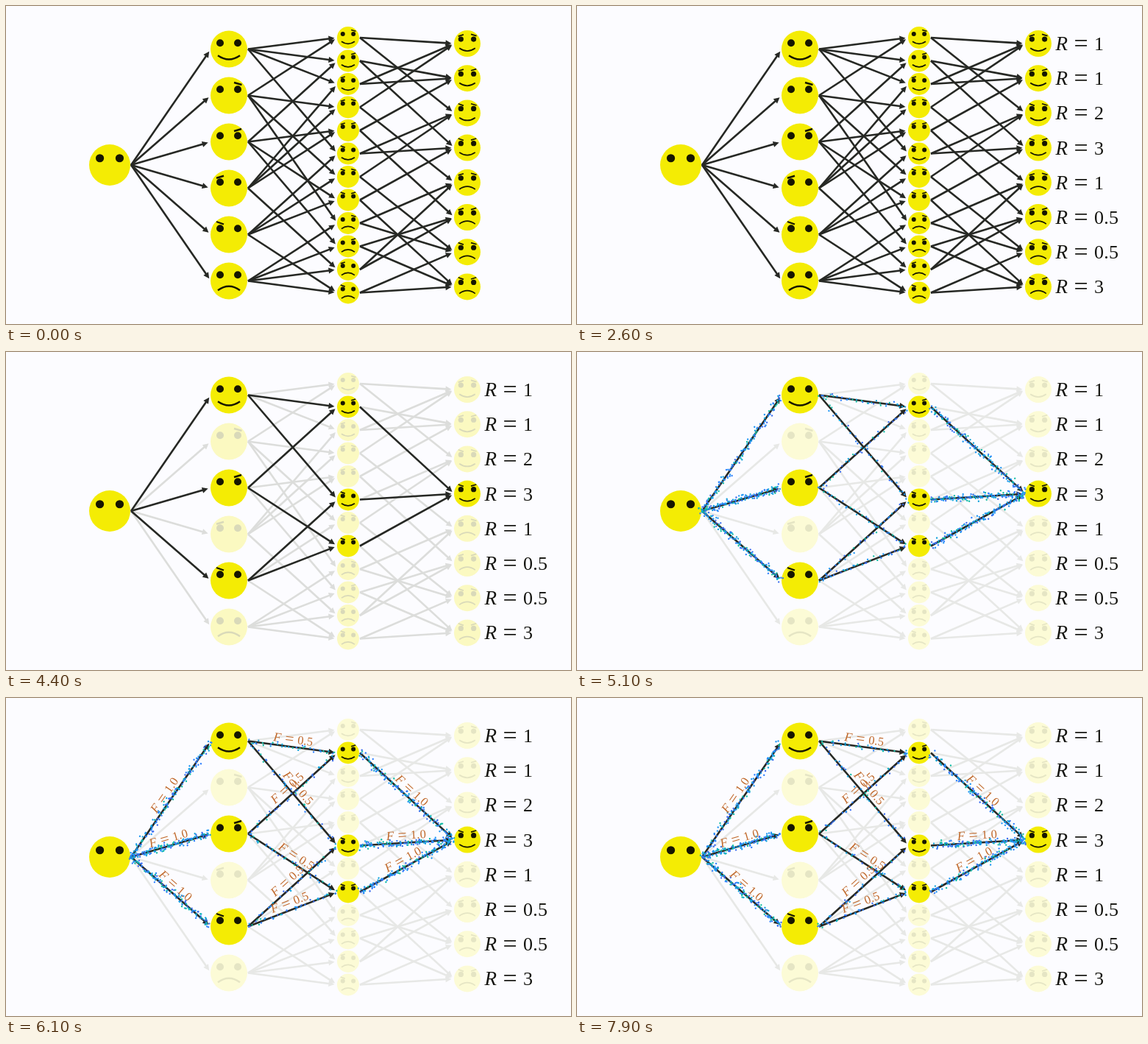
Animation of 768x432 px, one loop 8000 ms. Source, as an HTML page with a canvas:

```html
<!DOCTYPE html>
<html lang="en">
<head>
<meta charset="utf-8">
<title>Flow network of faces</title>
<style>
  html, body { margin: 0; width: 100%; height: 100%; overflow: hidden; background: #fcfcff; }
  canvas { display: block; width: 768px; height: 432px; }
</style>
</head>
<body>
<canvas id="stage" width="768" height="432"></canvas>
<script>
const ctx = document.getElementById('stage').getContext('2d');
const LOOP = 8000;
const SERIF = '"Liberation Serif", serif';
const REWARDS = ['1', '1', '2', '3', '1', '0.5', '0.5', '3'];
const DOTS = ['#2f80ff', '#14a4dc', '#10bca4', '#3a6cf0', '#1f96f4'];

const clamp = x => Math.max(0, Math.min(1, x));
const smooth = x => x * x * x * (10 - 15 * x + 6 * x * x);
const span = (t, from, to) => clamp((t - from) / (to - from));
const mix = (a, b, p) => `rgb(${a.map((v, i) => Math.round(v + (b[i] - v) * p))})`;

// Seeded random numbers
let seed = 7;
function rand() {
  seed = (seed * 1664525 + 1013904223) % 4294967296;
  return seed / 4294967296;
}

// Features: s smile, f frown, r/R right brow falling/rising, l/L left brow rising/falling
const LAYERS = [
  { x: 141, y: 216, step: 0, r: 28, parts: [''] },
  { x: 303, y: 58.5, step: 63, r: 25, parts: ['s', 'r', 'R', 'l', 'L', 'f'] },
  { x: 465, y: 43, step: 31.5, r: 15,
    parts: ['sr', 'sR', 'sl', 'rl', 'Rl', 'sL', 'rL', 'RL', 'fr', 'fR', 'fl', 'fL'] },
  { x: 627, y: 51, step: 47.2, r: 18,
    parts: ['srl', 'sRl', 'srL', 'sRL', 'frl', 'fRl', 'frL', 'fRL'] }
];
const GOAL = 'sRL';
const contains = (whole, part) => [...part].every(c => whole.includes(c));

const layers = LAYERS.map(({ x, y, step, r, parts }) =>
  parts.map((p, i) => ({ x, y: y + i * step, r, parts: p, hot: contains(GOAL, p) })));
const faces = layers.flat();

const edges = [];
for (let k = 0; k < 3; k++) {
  for (const a of layers[k]) {
    for (const b of layers[k + 1]) {
      if (contains(b.parts, a.parts)) edges.push(makeEdge(a, b, k === 1 ? 0.5 : 1));
    }
  }
}
edges.sort((a, b) => a.hot - b.hot);
const hotEdges = edges.filter(e => e.hot);

function makeEdge(a, b, flow) {
  const x = a.x + a.r + 1, y = a.y;
  const dx = b.x - b.r - x + 0.5, dy = b.y - y;
  return { x, y, angle: Math.atan2(dy, dx), length: Math.hypot(dx, dy) - 4, hot: b.hot && a.hot, flow };
}

const dots = hotEdges.flatMap(edge => {
  const count = edge.flow === 1 ? 130 : 34;
  return Array.from({ length: count }, (_, i) => ({
    edge,
    phase: (i + rand()) / count,
    speed: 0.45 + rand() * 0.06,
    offset: (rand() + rand() + rand() - 1.5) * 5 * edge.flow ** 0.4,
    color: DOTS[Math.floor(rand() * DOTS.length)]
  }));
});

function onEdge(edge, draw) {
  ctx.save();
  ctx.translate(edge.x, edge.y);
  ctx.rotate(edge.angle);
  draw();
  ctx.restore();
}

function line(x1, y1, x2, y2) {
  ctx.beginPath();
  ctx.moveTo(x1, y1);
  ctx.lineTo(x2, y2);
  ctx.stroke();
}

function disc(x, y, r) {
  ctx.beginPath();
  ctx.arc(x, y, r, 0, Math.PI * 2);
  ctx.fill();
}

function drawArrow(edge, dim) {
  const color = mix([38, 40, 36], [231, 232, 230], edge.hot ? 0 : dim);
  onEdge(edge, () => {
    ctx.strokeStyle = ctx.fillStyle = color;
    ctx.lineWidth = 2.6;
    line(0, 0, edge.length - 6, 0);
    ctx.beginPath();
    ctx.moveTo(edge.length, 0);
    ctx.lineTo(edge.length - 8, -4);
    ctx.lineTo(edge.length - 8, 4);
    ctx.fill();
  });
}

function drawFace({ x, y, r, parts, hot }, dim) {
  const p = hot ? 0 : dim;
  ctx.save();
  ctx.translate(x, y);
  ctx.fillStyle = mix([244, 236, 4], [252, 251, 214], p ** 1.8);
  disc(0, 0, r);
  ctx.fillStyle = ctx.strokeStyle = mix([22, 22, 0], [229, 229, 196], p);
  ctx.scale(r, r);
  disc(-0.48, -0.33, 0.2);
  disc(0.48, -0.33, 0.2);
  ctx.lineWidth = Math.max(0.095, 1.7 / r);
  const mouth = (end, control) => {
    ctx.beginPath();
    ctx.moveTo(-0.6, end);
    ctx.quadraticCurveTo(0, control, 0.6, end);
    ctx.stroke();
  };
  const features = {
    s: () => mouth(0.35, 0.77),
    f: () => mouth(0.51, 0.07),
    r: () => line(0.28, -0.7, 0.7, -0.58),
    R: () => line(0.28, -0.58, 0.68, -0.7),
    l: () => line(-0.68, -0.55, -0.28, -0.67),
    L: () => line(-0.68, -0.7, -0.28, -0.56)
  };
  for (const c of parts) features[c]();
  ctx.restore();
}

// Outline is traced first, then filled
function writeGlyph(char, font, x, y, a) {
  if (a <= 0) return;
  ctx.font = font;
  if (a < 1) {
    ctx.save();
    ctx.lineWidth = 0.8;
    ctx.setLineDash([Math.max(0.01, clamp(a * 2) * 70), 200]);
    ctx.globalAlpha = Math.min(1, 2 - a * 2);
    ctx.strokeText(char, x, y);
    ctx.restore();
  }
  if (a > 0.5) {
    ctx.save();
    ctx.globalAlpha = a * 2 - 1;
    ctx.fillText(char, x, y);
    ctx.restore();
  }
}

function writeFormula(letter, value, p) {
  const total = 1 + 0.2 * (value.length + 1);
  const part = i => clamp(p * total - 0.2 * i);
  writeGlyph(letter, `italic 27px ${SERIF}`, 0.5, 0, part(0));
  writeGlyph('=', `34px ${SERIF}`, 25.5, 2, part(1));
  let x = 53;
  [...value].forEach((c, i) => {
    writeGlyph(c, `26px ${SERIF}`, x, 0, part(i + 2));
    x += c === '.' ? 6.8 : 13.2;
  });
}

function drawRewards(p) {
  ctx.fillStyle = ctx.strokeStyle = '#141410';
  REWARDS.forEach((value, i) => {
    ctx.save();
    ctx.translate(650, layers[3][i].y + 9);
    writeFormula('R', value, p);
    ctx.restore();
  });
}

function drawDots(t) {
  const alpha = span(t, 4750, 5000);
  if (!alpha) return;
  ctx.globalAlpha = alpha;
  for (const { edge, phase, speed, offset, color } of dots) {
    const u = (phase + speed * (t - 4750) / 1000) % 1;
    ctx.fillStyle = color;
    onEdge(edge, () => disc(u * (edge.length + 4) - 1, offset, 1.2));
  }
  ctx.globalAlpha = 1;
}

function drawLabels(p) {
  if (!p) return;
  ctx.fillStyle = ctx.strokeStyle = '#c0682a';
  for (const edge of hotEdges) {
    onEdge(edge, () => {
      ctx.translate(edge.length / 2 - 26, -5);
      ctx.scale(0.63, 0.63);
      writeFormula('F', edge.flow.toFixed(1), p);
    });
  }
}

function draw(t) {
  ctx.fillStyle = '#fcfcff';
  ctx.fillRect(0, 0, 768, 432);
  const dim = smooth(span(t, 2800, 4800));
  edges.forEach(e => drawArrow(e, dim));
  faces.forEach(f => drawFace(f, dim));
  drawRewards(smooth(span(t, 300, 2300)));
  drawDots(t);
  drawLabels(span(t, 5200, 6050));
}

function tick() {
  draw(performance.now() % LOOP);
  requestAnimationFrame(tick);
}
tick();
</script>
</body>
</html>
```
